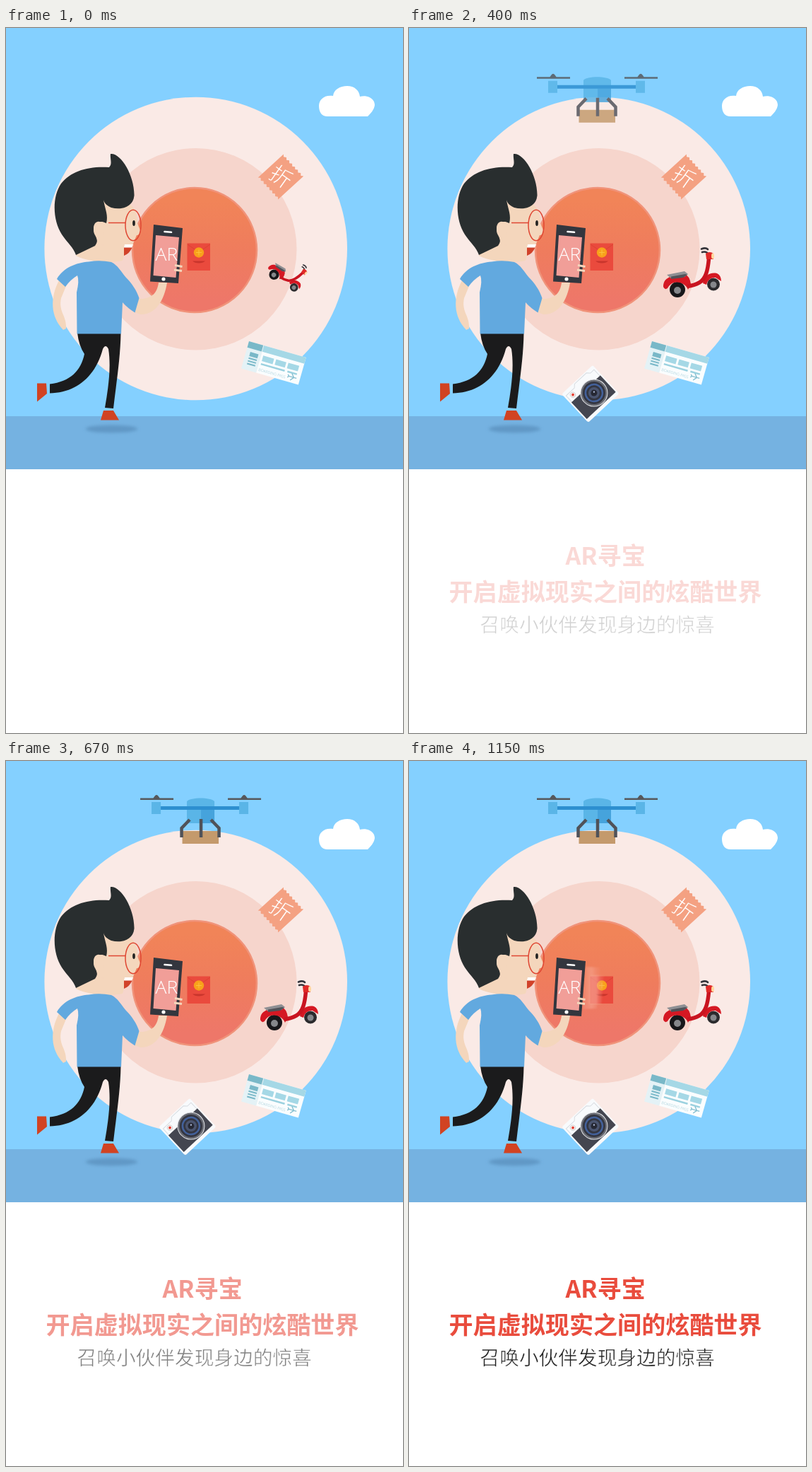
Recreate the animation shown at these times as an HTML page. Size 562 by 997 pixels, loop 1.18 s.

```html
<!DOCTYPE html>
<html lang="zh-CN">
<head>
<meta charset="utf-8">
<title>AR</title>
<style>
  html, body { margin: 0; width: 100%; height: 100%; overflow: hidden; background: #fff; }
  svg { display: block; width: 562px; height: 997px; }
  text { font-family: "Noto Sans CJK SC", "Noto Sans CJK", "Noto Sans", sans-serif; }
  .latin { font-family: "Open Sans", "Noto Sans", sans-serif; font-weight: 300; }
</style>
</head>
<body>
<svg viewBox="0 0 562 997">
  <defs>
    <linearGradient id="core" x2="0" y2="1">
      <stop offset=".1" stop-color="#f18458"/>
      <stop offset=".5" stop-color="#ef7c5d"/>
      <stop offset=".9" stop-color="#ee7769"/>
    </linearGradient>
    <linearGradient id="beam">
      <stop offset="0" stop-color="#f9b3a2" stop-opacity=".15"/>
      <stop offset=".5" stop-color="#f9b3a2" stop-opacity=".45"/>
      <stop offset="1" stop-color="#f39482" stop-opacity=".1"/>
    </linearGradient>
    <filter id="soft" x="-20%" y="-60%" width="140%" height="220%"><feGaussianBlur stdDeviation="2.2"/></filter>
    <filter id="haze"><feGaussianBlur stdDeviation="1"/></filter>
  </defs>

  <!-- backdrop -->
  <path fill="#84d0ff" d="M0 0H562V549H0Z"/>
  <path fill="#75b2e1" d="M0 549H562V624H0Z"/>
  <circle cx="268.7" cy="312" r="214.3" fill="#faeae6"/>
  <circle cx="268.7" cy="312.7" r="142.8" fill="#f6d5cc"/>
  <circle cx="267" cy="314" r="88" fill="url(#core)" stroke="#f0937a" stroke-width="2.5"/>
  <path fill="#fff" d="M455 125C447 125 443 119 443 110C443 101 451 94 463 96C464 87 473 82 483 82C493 82 500 88 501 97C512 94 522 100 522 109C521 116 516 121 512 125Z"/>

  <g id="drone">
    <path fill="#c49a6c" d="M240.500 99H292V117H240.500Z"/>
    <path fill="#5ab5e7" d="M197 58H210V75H197ZM321 58H334V75H321ZM247 57C252 51 281 51 286 57V84Q286 88 282 88H251Q247 88 247 84Z"/>
    <path fill="#46a3dc" d="M267 69H286V84Q286 88 282 88H267Z"/>
    <path fill="#2d8fd0" d="M210 64H321V69H210Z"/>
    <path fill="none" stroke="#505259" stroke-width="4.500" d="M251 83L239.500 95V108M281 83L292.500 95V108M267 82V108"/>
    <path fill="#56585c" d="M181 52.500H228V55H181ZM305 52.500H352V55H305ZM199 53L202 49Q204 47 206 49L209 53ZM323 53L326 49Q328 47 330 49L333 53Z"/>
  </g>

  <!-- coupon -->
  <g transform="translate(389 210.500) rotate(-42.500)">
    <path id="coupon" fill="#f4a182"/>
    <text text-anchor="middle" transform="rotate(78)" y="11" font-size="31" font-weight="300" fill="#fff" stroke="#f4a182" stroke-width=".8">折</text>
  </g>

  <g id="scooter">
    <path fill="none" stroke="#34343a" stroke-width="2.600" stroke-linecap="round" d="M414 312.500Q420 310 423 313M415 317Q421 315 425 321"/>
    <circle cx="380" cy="370" r="11" fill="#17171a"/>
    <circle cx="431" cy="362.500" r="9" fill="#2b2b2e"/>
    <circle cx="380" cy="371" r="5" fill="#85878b"/>
    <circle cx="431" cy="363" r="4.500" fill="#85878b"/>
    <path fill="#d51823" d="M360 366C360 355 367 350 390 348Q397 350 399 362L395 370C391 359 373 354 366 368Q362 371 360 366ZM416 361C418 350 426 345 436 347Q442 350 442 358L434 353Q424 352 421 363Z"/>
    <path fill="none" stroke="#c91420" stroke-width="5.500" d="M424.500 326C423 343 420 355 411 360Q404 364 394 365.500"/>
    <path fill="#8e8f93" d="M365 349L390 344L395 348L390 352L371 354Z"/>
    <path fill="#515359" d="M371 351.500L391 348L394 349L388 353L371 355Z"/>
    <path fill="#e02a28" d="M420 319Q426 315 431 319V327H421Z"/>
    <ellipse cx="430" cy="322.500" rx="2" ry="4" fill="#ffd9a0"/>
  </g>

  <!-- ticket -->
  <g transform="translate(344 443) rotate(15.900)">
    <path fill="#e4f2f6" d="M0 0H22V40H0Z"/>
    <path fill="#fafdfe" d="M22 0H84V40H22Z"/>
    <path fill="#a5d8e6" d="M22 0H84V9H22ZM25 14H41V22H25ZM44 14H59V22H44ZM62 14H78V22H62Z"/>
    <path fill="#79b8c8" d="M0 0H21V9H0ZM6 14H18V20H6ZM6 22H18V24H6ZM6 26H18V28H6ZM6 30H18V32H6Z"/>
    <path fill="#9bd1df" d="M25 25H60V27.500H25ZM64 25H78V27.500H64Z"/>
    <text class="latin" x="24" y="36.500" font-size="5.300" fill="#8fc3d0">BOARDING PASS</text>
    <path fill="none" stroke="#85bfd0" stroke-width="1.400" d="M67 32H79M75 32L71 27M75 32L71 37M68 32L66 30M68 32L66 34"/>
  </g>

  <g id="camera" transform="translate(256.500 517) rotate(-43)">
    <rect x="-30" y="-27" width="60" height="55" rx="3" fill="#f8fafc"/>
    <path fill="none" stroke="#d8dce1" d="M-27 -9V-21H-11L-7 -25H16L20 -21H27V-9"/>
    <path fill="#444650" d="M-28 -9H28V23H-28Z"/>
    <circle cx="-19" cy="-15.500" r="3.500" fill="#fff" stroke="#ccc"/>
    <circle cx="-19" cy="-15.500" r="2" fill="#e44438"/>
    <g transform="translate(4.600 3)">
      <circle r="19" fill="#6a6c74" stroke="#e4e6ea"/>
      <circle r="16" fill="#343641"/>
      <circle r="12" fill="none" stroke="#43619b" stroke-width="2.500"/>
      <circle r="8" fill="#4b5570"/>
      <circle r="4.500" fill="#262833"/>
      <circle cx="1" cy="-1" r="1.200" fill="#a9b6d4"/>
    </g>
  </g>

  <!-- packet -->
  <path fill="#ea4a3d" d="M256.500 304.500H289V343H256.500Z"/>
  <path fill="none" stroke="#d9402f" stroke-width=".8" d="M257 306L273 317L289 306"/>
  <circle cx="273" cy="317.500" r="7.200" fill="#f8a11b"/>
  <path fill="none" stroke="#fbc23c" d="M269 317.500H277M273 313.500V321.500"/>
  <path fill="#c9352c" d="M264 329.500H282Q279 332.500 273 332.500Q267 332.500 264 329.500Z"/>
  <g id="glow" filter="url(#haze)">
    <path fill="url(#beam)" d="M250 291L271 292L266 350L246 351Z"/>
    <path fill="url(#beam)" d="M256 303H276L272 344H254Z"/>
  </g>

  <!-- walker -->
  <ellipse cx="149.500" cy="567" rx="37" ry="5.500" fill="#6098c6" filter="url(#soft)"/>
  <g fill="#f4d6bc">
    <path d="M75 357C62 382 63 408 81 427L85 425C86 406 74 402 78 382L85 365Z"/>
    <path d="M186 383C205 384 214 376 216 360H228C224 386 211 406 190 405L180 401Z"/>
    <path d="M120 240L170 247C181 250 186 261 186 276L190 286C191 291 187 293 185 293L179 307L178 311L167 322L165 329C148 333 116 331 99 322Z"/>
  </g>
  <path fill="#fff" d="M168 306H180L178 311H167Z"/>
  <path fill="#d1422a" d="M167 310.500H178.500Q175 319 167 322Z"/>
  <path fill="#292e2f" d="M148 178C162 176 182 208 181.500 237C180 253 164 258 149 254C142 251 139 247 138 243C140 256 145 264 142 276C129 269 121 281 125 291C130 300 130 302 126 308L99 321C96 311 87 304 79 292C66 272 65 239 78 220C92 202 117 195 146 197C151 192 147 185 148 178Z"/>
  <path fill="#f4d6bc" d="M138 278C132 270 124 274 124 283C124 290 130 293 129 304L139 308Z"/>
  <g fill="none" stroke="#df4632" stroke-width="1.500">
    <ellipse cx="180" cy="279" rx="11" ry="21.700"/>
    <path d="M145 275.500H169"/>
  </g>
  <ellipse cx="181" cy="276" rx="1.900" ry="4" fill="#222"/>

  <path fill="#1b1b1c" d="M101 431H162.500C162 467 156 503 152 538L140 537C145 508 149 480 145 454Q141 446 137 454C126 496 96 516 62 516.500V503.500C91 500 106 485 111 461Q103 449 101 431Z"/>
  <path fill="#62a9df" d="M117 330.500Q133 328 149 331C158 335 164 346 170 353C178 361 185 371 188.500 382L182.500 402.500Q172 396 165 388L163 432.500H100.500L100 374Q104 357 101 350Q91 356 84 366L72 355C81 339 99 332 117 330.500Z"/>
  <path fill="#d14322" d="M44 502.500H57L58 517L44 528.500ZM138 541H152L160 554.500H134Z"/>

  <!-- phone -->
  <path fill="#33363e" d="M209 278L250 283L244 361L204 358.500Z"/>
  <path fill="#f19e98" d="M212 293L245 296L240.500 353L208.500 350Z"/>
  <path stroke="#fff" stroke-width="2.600" stroke-linecap="round" d="M224.500 288L234 288.800"/>
  <circle cx="223" cy="355" r="2.600" fill="#fff"/>
  <text class="latin" x="211.500" y="329" font-size="26.500" fill="#fff">AR</text>
  <path stroke="#f4d6bc" stroke-width="3" d="M239 335.500L249.500 337.500M238 342L249 343.500"/>

  <g id="copy">
    <g fill="#e94c3d" font-size="34.100" font-weight="700">
      <text x="221.500" y="759">AR寻宝</text>
      <text x="56.500" y="809.500">开启虚拟现实之间的炫酷世界</text>
    </g>
    <text x="100.500" y="854" font-size="27.700" font-weight="300" fill="#222" stroke="#fff" stroke-width=".6">召唤小伙伴发现身边的惊喜</text>
  </g>
</svg>
<script>
const get = id => document.getElementById(id);
const clamp = v => Math.max(0, Math.min(1, v));
const fade = (id, v) => get(id).setAttribute('opacity', clamp(v));
const move = (id, v) => get(id).setAttribute('transform', v);

// Perforated short sides of the coupon.
const teeth = 7, edge = [];
for (let i = 0; i <= teeth * 2; i++) edge.push([24.5 - i % 2 * 2.5, i * 42 / (teeth * 2) - 21]);
const outline = [...edge, ...edge.map(([x, y]) => [-x, -y])];
get('coupon').setAttribute('d', 'M' + outline.join('L') + 'Z');

const loop = 1180, hold = 100, tick = 30;

function draw(now) {
  const t = now % loop;
  const n = t < hold ? 0 : Math.floor((t - hold) / tick) + 1;

  // The drone rises into place, then drifts right and back.
  const rise = clamp((n - 1) / 12);
  const drift = 12 * Math.sin(Math.PI * clamp((n - 17) / 11));
  move('drone', `translate(${drift} ${100 * (1 - rise)})`);
  fade('drone', rise);

  const left = Math.pow(1 - clamp(n / 8), 1.4);
  move('scooter', `translate(400 345) rotate(${41 * left}) scale(${1 - 0.35 * left}) translate(-400 -345)`);

  fade('camera', n / 9);
  fade('copy', Math.pow(n / 28, 1.7));
  fade('glow', (n - 20) / 10);
  requestAnimationFrame(draw);
}
draw(0);
</script>
</body>
</html>
```
